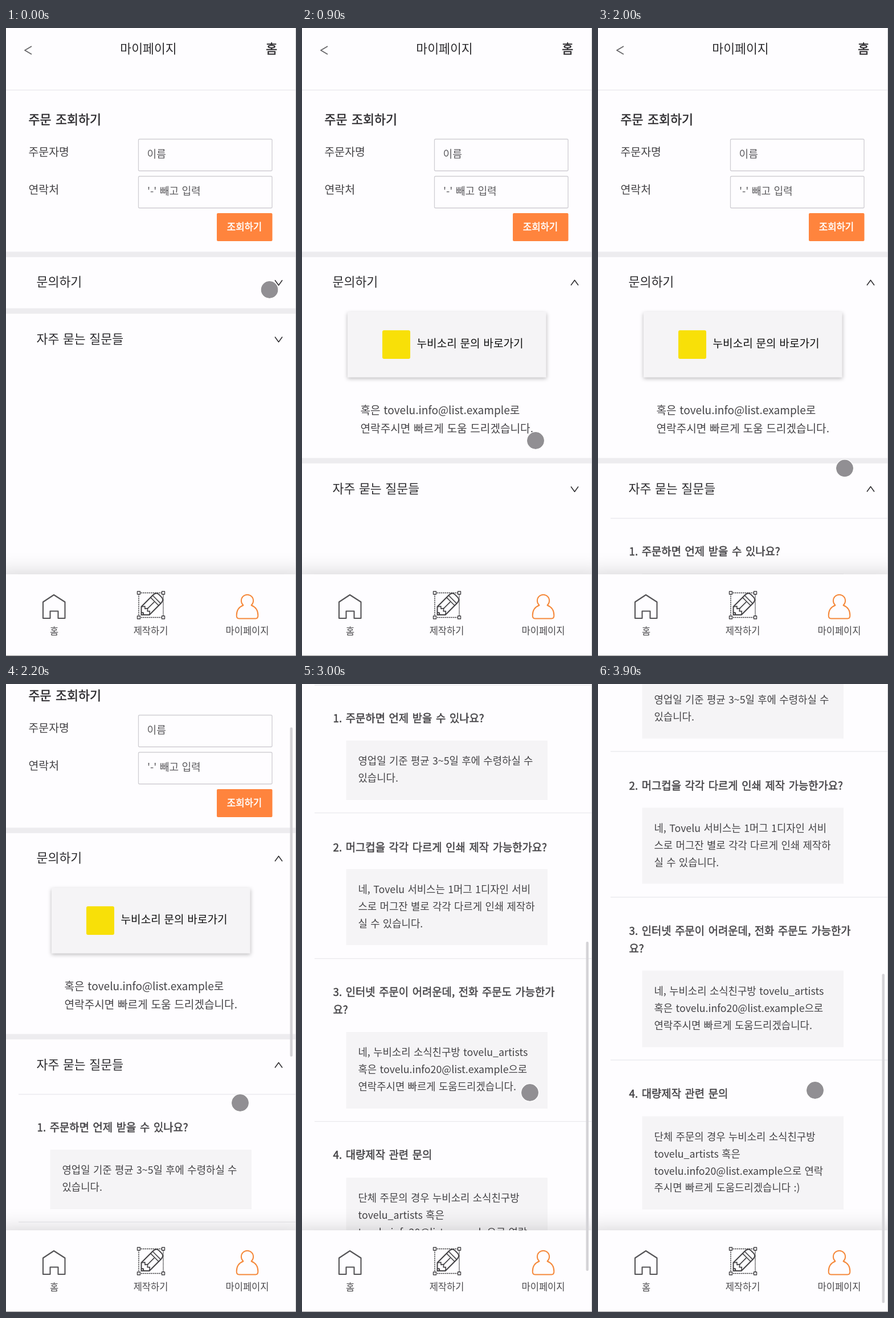
Recreate the animation shown at these times as an HTML page with a canvas. Size 509 by 1099 pixels, loop 4000 ms.

```html
<!DOCTYPE html>
<html lang="ko">
<head>
<meta charset="utf-8">
<title>마이페이지</title>
<style>
  html, body { margin: 0; width: 100%; height: 100%; overflow: hidden; background: #fefdff; }
  canvas { display: block; width: 509px; height: 1099px; }
</style>
</head>
<body>
<canvas id="stage" width="509" height="1099" lang="ko"></canvas>
<script>
const W = 509, H = 1099, LOOP = 4000, STEP = 100;
const NAV_TOP = 956, PANEL = 262;
const BG = '#fefdff', INK = '#444346', DARK = '#2c2b2e', SOFT = '#f5f4f6', ORANGE = '#ff843d';
const FONT = '"Noto Sans CJK KR", "Noto Sans CJK", sans-serif';
const ctx = document.getElementById('stage').getContext('2d');

const scrollKeys = [[2000, 0], [2100, 30], [2200, 140], [2300, 400], [2400, 640], [2500, 800],
  [2600, 856], [3000, 856], [3100, 872], [3200, 897], [3300, 909], [3600, 909], [3900, 963.5]];
const pointerKeys = [[0, 462.5, 458], [100, 465, 456], [300, 464, 459], [400, 459, 485],
  [600, 436, 610], [800, 413, 709], [900, 410, 722], [1100, 424, 755], [1400, 459, 811],
  [1600, 458, 813], [1800, 455, 808], [2200, 411, 733], [2600, 404, 718], [3000, 400, 715],
  [3300, 381, 711]];

const faq = [
  { line: 858, ask: 916, box: 955, height: 104,
    q: ['1. 주문하면 언제 받을 수 있나요?'],
    a: ['영업일 기준 평균 3~5일 후에 수령하실 수', '있습니다.'] },
  { line: 1081.5, ask: 1141.5, box: 1180, height: 133,
    q: ['2. 머그컵을 각각 다르게 인쇄 제작 가능한가요?'],
    a: ['네, Tovelu 서비스는 1머그 1디자인 서비', '스로 머그잔 별로 각각 다르게 인쇄 제작하', '실 수 있습니다.'] },
  { line: 1336.5, ask: 1395, box: 1465, height: 134,
    q: ['3. 인터넷 주문이 어려운데, 전화 주문도 가능한가', '요?'],
    a: ['네, 누비소리 소식친구방 tovelu_artists', '혹은 tovelu.info20@list.example으로', '연락주시면 빠르게 도움드리겠습니다.'] },
  { line: 1621.5, ask: 1680, box: 1720, height: 163,
    q: ['4. 대량제작 관련 문의'],
    a: ['단체 주문의 경우 누비소리 소식친구방', 'tovelu_artists 혹은', 'tovelu.info20@list.example으로 연락', '주시면 빠르게 도움드리겠습니다 :)'] }
];

// Linear interpolation through [time, ...values] keys
function sample(keys, t) {
  if (t <= keys[0][0]) return keys[0].slice(1);
  for (let i = 1; i < keys.length; i++) {
    const [a, b] = [keys[i - 1], keys[i]];
    if (t <= b[0]) {
      const p = (t - a[0]) / (b[0] - a[0]);
      return a.slice(1).map((v, k) => v + (b[k + 1] - v) * p);
    }
  }
  return keys[keys.length - 1].slice(1);
}

// y is the middle of the Hangul glyphs; a thin outline gives the medium weight
function text(str, x, y, size, { color = INK, medium = false, align = 'left' } = {}) {
  const base = y + size * 0.38;
  ctx.font = `${size}px ${FONT}`;
  ctx.wordSpacing = `${size * (medium ? 0.13 : 0.075)}px`;
  ctx.textAlign = align;
  ctx.fillStyle = ctx.strokeStyle = color;
  ctx.fillText(str, x, base);
  if (medium) {
    ctx.lineWidth = 0.5;
    ctx.strokeText(str, x, base);
  }
}

function rect(x, y, w, h, color) {
  ctx.fillStyle = color;
  ctx.fillRect(x, y, w, h);
}

function round(x, y, w, h, r, fill, stroke) {
  ctx.beginPath();
  ctx.roundRect(x, y, w, h, r);
  if (fill) { ctx.fillStyle = fill; ctx.fill(); }
  if (stroke) { ctx.strokeStyle = stroke; ctx.lineWidth = 1.3; ctx.stroke(); }
}

function path(d, color, width) {
  ctx.strokeStyle = color;
  ctx.lineWidth = width;
  ctx.lineJoin = 'round';
  ctx.stroke(new Path2D(d));
}

function shadowed(color, blur, dy, draw) {
  ctx.save();
  ctx.shadowColor = color;
  ctx.shadowBlur = blur;
  ctx.shadowOffsetY = dy;
  draw();
  ctx.restore();
}

function chevron(y, up) {
  const d = up ? 4.5 : -4.5;
  path(`M472 ${y + d}L478.5 ${y - d}L485 ${y + d}`, DARK, 1.5);
}

function orderForm() {
  const hint = { color: '#5c5b5e' };
  path('M45 32L33 39L45 46', '#68676a', 1.8);
  text('마이페이지', 250, 35.5, 21.6, { color: DARK, align: 'center' });
  text('홈', 466, 35.5, 22, { color: DARK, medium: true, align: 'center' });
  rect(0, 108, W, 1.2, '#e8e7eb');
  text('주문 조회하기', 39.5, 159.5, 21.7, { color: DARK, medium: true });
  text('주문자명', 39.5, 217, 19.4);
  text('연락처', 39.5, 282.5, 19.4);
  round(232.5, 194.5, 234.5, 55.5, 2, BG, '#cfced3');
  round(232.5, 259.5, 234.5, 55.5, 2, BG, '#cfced3');
  text('이름', 247.5, 220.5, 18.1, hint);
  text("'-' 빼고 입력", 248, 285.5, 18.1, hint);
  round(370, 324, 97.5, 49, 2, ORANGE);
  text('조회하기', 418.5, 347.5, 16.7, { color: '#fff', medium: true, align: 'center' });
  rect(0, 391.5, W, 9.5, '#edecef');
}

function contact(open) {
  text('문의하기', 53.5, 444, 21.7, { color: DARK });
  chevron(445.7, open > 0);
  if (!open) return;
  ctx.save();
  ctx.beginPath();
  ctx.rect(0, 480, W, 10 + PANEL * open);
  ctx.clip();
  shadowed('rgba(0,0,0,.27)', 7, 2, () => rect(80, 496.5, 348.5, 115, SOFT));
  round(141, 529, 49, 50, 3, '#f8e008');
  text('누비소리 문의 바로가기', 201.5, 552, 19.1, { color: '#111' });
  text('혹은 tovelu.info@list.example로', 102.5, 669, 19.1);
  text('연락주시면 빠르게 도움 드리겠습니다.', 102.5, 700.5, 19.1);
  ctx.restore();
}

function questions(open, shift) {
  rect(0, 490.5 + shift, W, 9.5, '#edecef');
  text('자주 묻는 질문들', 53.5, 543.5 + shift, 21.7, { color: DARK });
  chevron(545 + shift, open);
  if (!open) return;
  for (const item of faq) {
    rect(22, item.line - 0.6, W - 22, 1.3, '#eae9ed');
    item.q.forEach((s, i) => text(s, 54.5, item.ask + i * 31.3, 18.8, { medium: true }));
    rect(77.5, item.box, 353.5, item.height, SOFT);
    item.a.forEach((s, i) => text(s, 98.5, item.box + 35.7 + i * 29.8, 17.8));
  }
}

function pencil() {
  ctx.setLineDash([2.5, 1]);
  path('M233 988.5H276V1031.5H233Z', INK, 1.4);
  ctx.setLineDash([]);
  for (const x of [230.5, 273.5])
    for (const y of [986, 1029]) {
      rect(x, y, 5, 5, BG);
      path(`M${x} ${y}h5v5h-5Z`, INK, 1.4);
    }
  ctx.save();
  ctx.translate(254.5, 1010);
  ctx.rotate(-Math.PI / 4);
  path('M-24 0L-14 -10H15Q23 -10 23 -3V3Q23 10 15 10H-14Z', INK, 2);
  path('M-14 -10L-9 -6L-12 -3L-8 0L-12 3L-9 6L-14 10', INK, 1.6);
  path('M-8 0H8M9 -10V10M14 -10V10', INK, 1.6);
  path('M-21 -2.5L-19 0L-21 2.5', INK, 2);
  ctx.restore();
}

function navBar() {
  const label = { color: '#4a494c', align: 'center' };
  shadowed('rgba(0,0,0,.17)', 34, -2, () => rect(-20, NAV_TOP, W + 40, H - NAV_TOP + 30, BG));
  path('M65 1004.5L84 992L103.5 1004.5V1033H91.5V1020.5H77.5V1033H65Z', '#555457', 2.1);
  pencil();
  path('M416.5 1010.2A10.6 10.6 0 1 1 430.5 1010.2C438 1013 442.3 1019 442.3 1028'
    + 'Q442.3 1033.5 438 1033.5H409Q404.7 1033.5 404.7 1028C404.7 1019 409 1013 416.5 1010.2Z',
    '#f5893b', 2);
  text('홈', 84.5, 1055.5, 16.5, label);
  text('제작하기', 254, 1054.5, 16.5, label);
  text('마이페이지', 423.5, 1054.5, 16.5, label);
}

function pointer(x, y) {
  ctx.beginPath();
  ctx.arc(x, y, 15, 0, Math.PI * 2);
  ctx.fillStyle = '#918f93';
  ctx.fill();
  ctx.beginPath();
  ctx.arc(x, y, 15.6, 0, Math.PI * 2);
  ctx.strokeStyle = 'rgba(255,255,255,.8)';
  ctx.lineWidth = 1.2;
  ctx.stroke();
}

function render(t) {
  const [scroll] = sample(scrollKeys, t);
  const open = t < 300 ? 0 : t < 400 ? 0.5 : 1;
  rect(0, 0, W, H, BG);
  ctx.save();
  ctx.translate(0, -scroll);
  orderForm();
  contact(open);
  questions(t >= 1700, PANEL * open);
  ctx.restore();
  navBar();
  if (scroll > 0) round(498.5, 2.7 + scroll * 0.5237, 4.5, 576, 2, '#d4d3d7');
  rect(508, 0, 1, H, '#cfced2');
  rect(0, 1098, W, 1, '#98979a');
  pointer(...sample(pointerKeys, t));
}

const start = performance.now();
function tick() {
  const t = (performance.now() - start) % LOOP;
  render(Math.floor(t / STEP) * STEP);
  requestAnimationFrame(tick);
}
tick();
</script>
</body>
</html>
```
